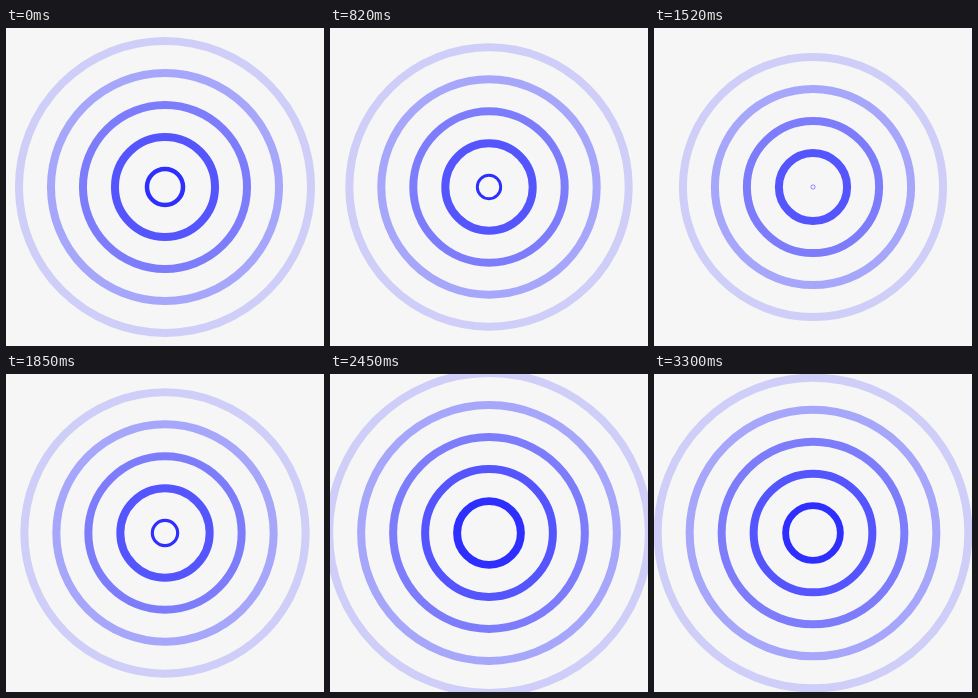
An HTML page for the animation above (3.33 s loop, 318 by 318 pixels).

```html
<!DOCTYPE html>
<html lang="en">
<head>
<meta charset="utf-8">
<title>Ripple</title>
<style>
  /* --grow: radius of the innermost ring; the others sit 32px apart outside it */
  @property --grow {
    syntax: "<length>";
    inherits: true;
    initial-value: 18px;
  }
  html, body {
    margin: 0;
    width: 100%;
    height: 100%;
    overflow: hidden;
    background: #f6f6f6;
  }
  svg {
    display: block;
    width: 100vw;
    height: 100vh;
    animation: ripple 3330ms linear infinite;
  }
  circle {
    fill: none;
    stroke: #2e2eff;
    stroke-width: 8px;
    r: calc(var(--grow) + var(--i) * 32px);
  }
  .core {
    r: var(--grow);
    stroke-width: calc(var(--grow) / 4);
  }
  @keyframes ripple {
    0% { --grow: 18px; }
    13.66% { --grow: 32px; }
    13.67% { --grow: 0px; }
    43.69% { --grow: 32px; }
    43.7% { --grow: 0px; }
    73.72% { --grow: 32px; }
    73.73% { --grow: 0px; }
    100% { --grow: 28.3px; }
  }
</style>
</head>
<body>
<svg viewBox="0 0 318 318">
  <circle class="core" cx="159" cy="159"/>
  <circle style="--i: 1" cx="159" cy="159" opacity=".8"/>
  <circle style="--i: 2" cx="159" cy="159" opacity=".6"/>
  <circle style="--i: 3" cx="159" cy="159" opacity=".4"/>
  <circle style="--i: 4" cx="159" cy="159" opacity=".2"/>
</svg>
</body>
</html>
```
